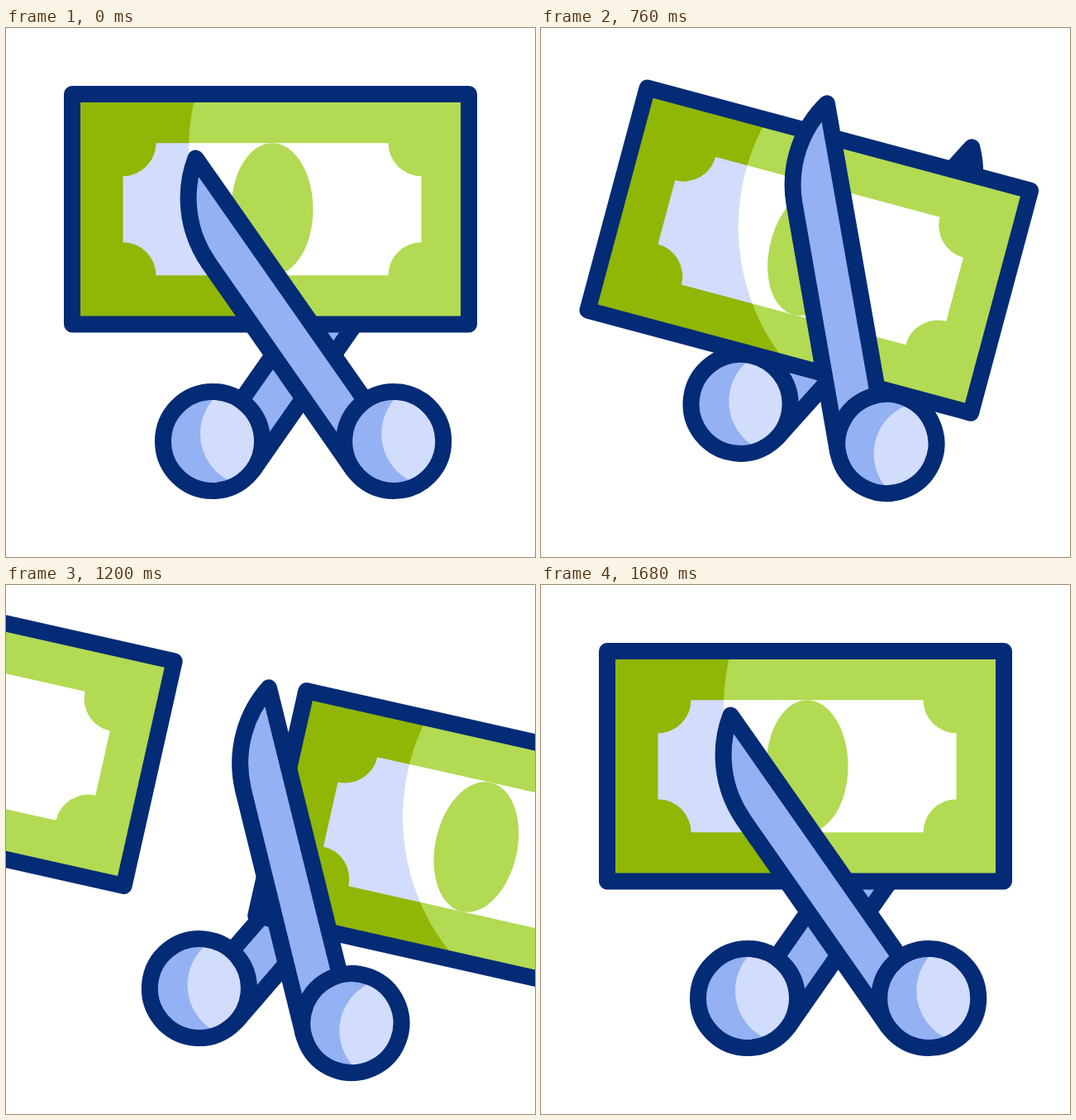
Write an HTML page that moves like this. It is 640 px wide and 640 px high and loops after 2 s.

```html
<!DOCTYPE html>
<html lang="en">
<head>
<meta charset="utf-8">
<title>Scissors cutting a banknote</title>
<style>
  html, body { margin: 0; height: 100%; overflow: hidden; background: #fff; }
  svg { display: block; width: 100vw; height: 100vh; }
  .line { stroke: #032b76; stroke-width: 20; stroke-linejoin: round; stroke-linecap: round; }
  .blue { fill: #93b1f3; }
  .pale { fill: #d2dcfd; }
  .dark { fill: #90b606; }
  .green { fill: #b2da53; }
</style>
</head>
<body>
<svg viewBox="0 0 640 640">
  <defs>
    <clipPath id="billArea"><rect x="-240" y="-139.25" width="480" height="278.5"/></clipPath>
    <clipPath id="lit"><circle cx="162" cy="-72.7" r="261"/></clipPath>
    <clipPath id="ringArea"><circle r="60"/></clipPath>
    <path id="panel" d="M-138.5 -80H142.5A40 40 0 0 0 182.5 -40V40A40 40 0 0 0 142.5 80H-138.5A40 40 0 0 0 -178.5 40V-40A40 40 0 0 0 -138.5 -80Z"/>
    <g id="bill">
      <g clip-path="url(#billArea)">
        <rect class="dark" x="-240" y="-140" width="480" height="280"/>
        <use href="#panel" class="pale"/>
        <g clip-path="url(#lit)">
          <rect class="green" x="-240" y="-140" width="480" height="280"/>
          <use href="#panel" fill="#fff"/>
        </g>
        <ellipse class="green" cx="2" rx="49.5" ry="80"/>
      </g>
      <rect class="line" fill="none" x="-240" y="-139.25" width="480" height="278.5"/>
    </g>
    <path id="blade" class="line blue" d="M109.6 104L-130.1 -238.5C-144.6 -201 -142.6 -153 -114.6 -112L60.3 138.4"/>
    <g id="ring">
      <circle class="blue" r="60"/>
      <g clip-path="url(#ringArea)"><circle class="pale" cx="48.5" cy="-9" r="63.5"/></g>
      <circle class="line" fill="none" r="60"/>
    </g>
  </defs>
  <g id="backHalf">
    <use href="#blade" transform="scale(-1 1)"/>
    <use href="#ring" x="-109.6" y="104"/>
  </g>
  <use id="cutBill" href="#bill"/>
  <use id="nextBill" href="#bill"/>
  <g id="frontHalf">
    <use href="#blade"/>
    <use href="#ring" x="109.6" y="104"/>
  </g>
</svg>
<script>
const LOOP = 2000, STEP = 40, LAST = 42, SPACING = 690;

const clamp = x => Math.min(1, Math.max(0, x));
const ramp = (t, from, to) => {
  const x = clamp((t - from) / (to - from));
  return x * x * (3 - 2 * x);
};

const place = (id, x, y, angle, slide = 0) =>
  document.getElementById(id).setAttribute("transform",
    `translate(${x} ${y}) rotate(${angle}) translate(${slide} 0)`);

function draw(now) {
  const t = Math.min(LAST, Math.floor(now % LOOP / STEP));

  // Everything tilts into the cut, then settles back with a dip on the way.
  const back = ramp(t, 26, LAST), hold = 1 - back;
  const dip = 4 * back * hold;
  const tilt = ramp(t, 0, 14) * hold;

  // Bills: a small recoil, then one bill pushes the other off the stage.
  const x = 320 + 21.3 * tilt, y = 219.25 + 54.4 * tilt;
  const recoil = -33.5 * Math.sin(tilt * Math.PI / 2);
  const run = 1 - (1 - clamp((t - 14) / 28) ** 2.7) ** 2.43;
  const slide = recoil + SPACING * run;
  place("cutBill", x, y, 15 * tilt, slide - 88 * dip);
  place("nextBill", x, y, 15 * tilt, slide - SPACING);

  // Scissors: swing as a whole, snip shut, then open a little.
  const release = ramp(t, 14, 19);
  const swing = (20.5 * ramp(t, 0, 11.7) - 4.5 * release) * hold;
  const snip = (17.5 * ramp(t, 0, 9) - 8.5 * release) * hold;
  const lift = ramp(t, 0, 7) * hold;
  const pivotX = 359.6 + 3.4 * tilt * tilt - 16 * dip;
  const pivotY = 396 + 49.3 * dip;
  place("backHalf", pivotX, pivotY - 31 * lift, swing - snip);
  place("frontHalf", pivotX, pivotY - 33.6 * lift, swing + snip);
}

const start = performance.now();
function tick() {
  draw(performance.now() - start);
  requestAnimationFrame(tick);
}
tick();
</script>
</body>
</html>
```
